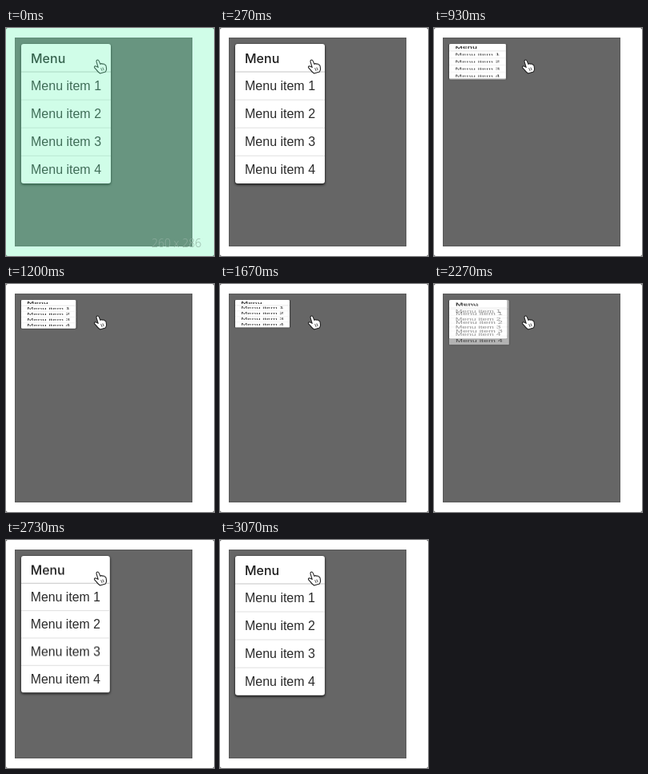
Animation, 260 px wide and 286 px high, one loop 3140 ms. Source, as an HTML page:

```html
<!DOCTYPE html>
<html lang="en">
<head>
<meta charset="utf-8">
<title>Collapsing menu</title>
<style>
  html, body { margin: 0; height: 100%; overflow: hidden; background: #fff; }
  svg { display: block; }
  .title { font: 500 16px Inter, sans-serif; fill: #1c1c1c; }
  .item { font: 16px "Liberation Sans", Arial, sans-serif; fill: #2a2a2a; }
  .size { font: 300 14px "Open Sans", "Noto Sans", sans-serif; fill: #8fae9f; }
  .shadow { fill: #333; filter: drop-shadow(0 1px 1.5px #000a); }
</style>
</head>
<body>
<svg width="260" height="286" viewBox="0 0 260 286">
  <defs>
    <g id="menu">
      <rect class="shadow" width="112" height="175.5" rx="3"/>
      <rect width="112" height="175" rx="3" fill="#fff"/>
      <g id="rows"><text class="title" x="12" y="24">Menu</text></g>
    </g>
  </defs>

  <rect width="260" height="286" fill="#555"/>
  <rect width="260" height="286" rx="2.5" fill="#fff"/>
  <rect x="11.5" y="12.5" width="221" height="261" fill="#666" stroke="#5a5a5a"/>

  <use id="inner" href="#menu"/>
  <use id="outer" href="#menu" opacity=".5"/>

  <g fill="#fff" stroke="#222" stroke-width="1.1" stroke-linejoin="round" stroke-linecap="round">
    <path d="M113 42.2Q112.8 40.2 114.3 40Q115.6 39.8 116.2 41.4L117.9 45.4
      Q119.6 43.9 120.8 45.3Q122.4 44.4 123.2 46Q124.8 45.8 125.1 47.8L125.6 51.2
      Q125.6 53.2 124.3 55L117.6 57Q114.6 55 113.2 52.6L110.7 49.8
      Q110 48 111.6 47.8Q113 47.9 115.2 49.4Z"/>
    <path d="M118.8 50.5l1.2 3M121 49.8l1.1 3" fill="none" stroke-width=".8"/>
  </g>

  <g id="flash">
    <rect width="260" height="286" fill="rgb(108 248 183)" opacity=".32"/>
    <text class="size" x="182" y="274.5">260 x 286</text>
  </g>
</svg>
<script>
const LOOP = 3140, STEP = 200 / 3, LAST_STEP = 46;
const COLLAPSE = 430, EXPAND = 2200, FLASH = 267;
const byId = id => document.getElementById(id);

byId("rows").innerHTML += [1, 2, 3, 4].map(n => {
  const y = n * 35.1;
  return `<path d="M0 ${y - 0.1}h112" stroke="${n === 1 ? "#c4c4c4" : "#e0e0e0"}"/>
    <text class="item" x="12" y="${y + 22.9}">Menu item ${n}</text>`;
}).join("");

// Remaining distance of a critically damped spring, 1 to 0.
function spring(ms, rate) {
  const x = Math.max(0, ms) / 1000 * rate;
  return (1 + x) * Math.exp(-x);
}

const collapsed = t => t < EXPAND
  ? 1 - spring(t - COLLAPSE, 8.8)
  : spring(t - EXPAND, 10.5);

function place(id, amount) {
  const sx = 1 - 0.393 * amount, sy = 1 - 0.803 * amount;
  byId(id).setAttribute("transform", `translate(19 20) scale(${sx} ${sy})`);
}

function draw(now) {
  const step = Math.min(LAST_STEP, Math.floor((now % LOOP + 4) / STEP));
  const t = step * STEP;

  // Two neighbouring poses are averaged, the larger one on top.
  const poses = [collapsed(t), collapsed(Math.max(0, t - 16))];
  place("inner", Math.max(...poses));
  place("outer", Math.min(...poses));

  byId("flash").setAttribute("opacity", Math.max(0, 1 - t / FLASH));
  requestAnimationFrame(() => draw(performance.now() - start));
}

const start = performance.now();
draw(0);
</script>
</body>
</html>
```
